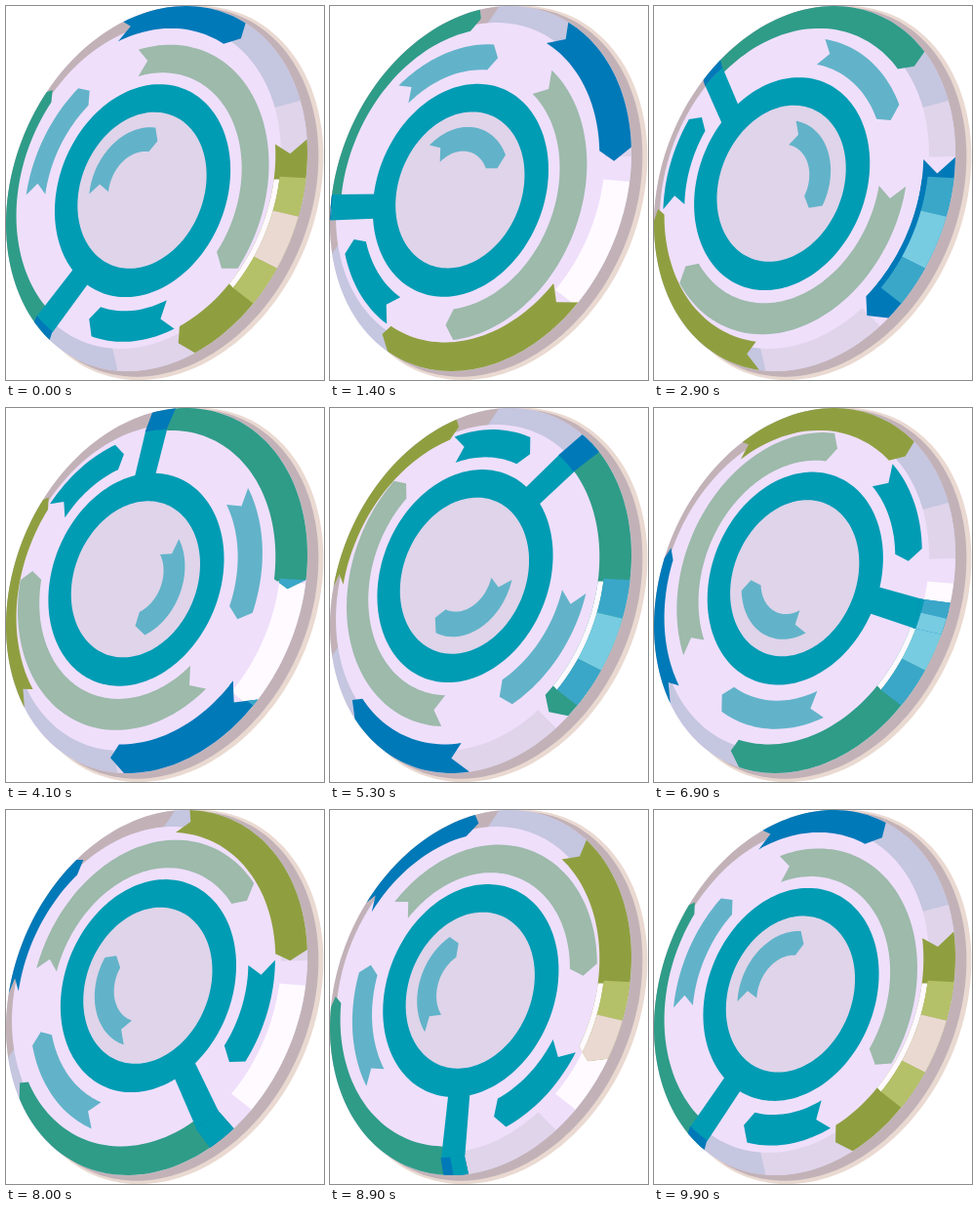
An HTML page with a canvas for the animation above (10 s loop, 326x383 px).

```html
<!DOCTYPE html>
<html lang="en">
<head>
<meta charset="utf-8">
<style>
html, body { margin: 0; width: 326px; height: 383px; overflow: hidden; background: #fff; }
canvas { display: block; }
</style>
</head>
<body>
<canvas id="stage" width="326" height="383"></canvas>
<script>
const ctx = document.getElementById('stage').getContext('2d');
const LOOP = 10000, STEP = 100, RAD = Math.PI / 180;
const AX = 154.5, SHEAR = -36.3, AY = 183.4;
const RIM = 0.893, EDGE = 0.86;
const TEAL = '#009cb4', SKY = '#62b3c9', PALE = '#dfd4ea', FACE = '#efdffb', SHINE = '#fffaff';

// Centre of the disc's contour at each radius: the face bulges up and left.
const CENTRES = [[0.3, 135, 179], [0.42, 138, 180.5], [0.55, 138, 180.5], [RIM, 144, 184], [1, 154.5, 187]];

// Fixed light on the bevel: start angle, end angle, colour.
const BEVEL = [
  [170, 277, '#c2b2b8'], [277, 342.4, '#c5c6e0'], [342.4, 361, PALE],
  [1, 9, FACE], [9, 51, SHINE], [51, 60, FACE],
  [60, 105, PALE], [105, 170, '#c5c6e0']
];

// Base, half-lit, lit, and the lit strip on the flat face.
const BLUE = ['#0079b8', '#3aa7c9', '#77cce1', '#0079b8'];
const OLIVE = ['#8f9f40', '#b5c168', '#ead9d1', SHINE];
const GREEN = ['#2f9c88', '#3aa7c9', '#77cce1', SHINE];

let spin = 0;

function map(x, y, c) {
  return [c[0] + AX * x, c[1] + SHEAR * x + AY * y];
}

function centre(r) {
  const last = CENTRES.length - 1;
  let i = 1;
  while (i < last && r > CENTRES[i][0]) i++;
  const [r0, x0, y0] = CENTRES[i - 1], [r1, x1, y1] = CENTRES[i];
  const k = Math.min(1, Math.max(0, (r - r0) / (r1 - r0)));
  return [x0 + (x1 - x0) * k, y0 + (y1 - y0) * k];
}

// Point in stage space, angle in degrees.
function fixed(r, a) {
  return map(r * Math.cos(a * RAD), r * Math.sin(a * RAD), centre(r));
}

// Point on the turning disc, with slight perspective.
function turning(r, a, off) {
  const b = (a + spin) * RAD;
  const p = fixed(r, (b + 0.085 * Math.min(1, r) * Math.sin(b - Math.PI / 4)) / RAD);
  if (!off) return p;
  const w = (78.6 + spin) * RAD;
  return map(0.048 * Math.cos(w), 0.048 * Math.sin(w), p);
}

function trace(points) {
  ctx.beginPath();
  points.forEach(p => ctx.lineTo(p[0], p[1]));
  ctx.closePath();
}

function fill(points, color) {
  trace(points);
  ctx.fillStyle = color;
  ctx.fill();
}

function arc(at, r, a, b) {
  const n = Math.max(2, Math.ceil(Math.abs(b - a) / 2));
  return Array.from({ length: n + 1 }, (_, i) => at(r, a + (b - a) * i / n));
}

function oval(cx, cy, scale) {
  return arc((r, a) => map(r * Math.cos(a * RAD), r * Math.sin(a * RAD), [cx, cy]), scale, 0, 360);
}

function sector(r0, r1, a, b, color) {
  fill([...arc(fixed, r1, a, b), ...arc(fixed, r0, b, a)], color);
}

// Band with a notched tail and a pointed head.
function arrow(r0, r1, tail, head, notch, tip, off) {
  const at = (r, a) => turning(r, a, off);
  const mid = (r0 + r1) / 2;
  return [
    ...arc(at, r1, tail, head), at(mid, head + tip),
    ...arc(at, r0, head, tail), at(mid, tail + notch)
  ];
}

// Shape on the bevel, brightened where the light falls.
function lit(points, [base, mid, high, strip], low) {
  fill(points, base);
  ctx.save();
  trace(points);
  ctx.clip();
  sector(0.84, RIM, 9, 50, strip);
  sector(RIM, 1.02, 8, 20, mid);
  sector(RIM, 1.02, 20, 37, high);
  sector(RIM, 1.02, 37, 50, mid);
  if (low) sector(0.84, 1.02, 50, 100, low);
  ctx.restore();
}

function ring(r0, r1, color) {
  const at = (r, a) => turning(r, a, true);
  ctx.beginPath();
  for (const r of [r0, r1]) {
    arc(at, r, 0, 360).forEach((p, i) => i ? ctx.lineTo(p[0], p[1]) : ctx.moveTo(p[0], p[1]));
    ctx.closePath();
  }
  ctx.fillStyle = color;
  ctx.fill('evenodd');
}

// The handle sits a little below the face centre and is cut off by the disc's edge.
function handle(a) {
  const shift = points => points.map(([x, y]) => [x - 5, y + 5]);
  ctx.save();
  trace(oval(154.5, 187, 1));
  ctx.clip();
  fill(shift([
    turning(0.5, a - 8, true), turning(0.9, a - 4.8),
    turning(0.9, a + 4.8), turning(0.5, a + 8, true)
  ]), TEAL);
  lit(shift([...arc(turning, 1.07, a - 4.4, a + 4.4), ...arc(turning, RIM, a + 4.8, a - 4.8)]),
    [...BLUE.slice(0, 3), TEAL], TEAL);
  ctx.restore();
}

function draw(t) {
  spin = t / LOOP * 360;
  ctx.fillStyle = '#fff';
  ctx.fillRect(0, 0, 326, 383);

  fill(oval(167, 191.5, 1.025), '#ead9d1');
  fill(oval(164, 190.5, 1.012), '#c2b2b8');
  fill(oval(154.5, 187, 1), PALE);
  BEVEL.forEach(([a, b, color]) => sector(0.88, 1, a, b + 0.3, color));
  fill(oval(144, 184, RIM), FACE);

  lit(arrow(EDGE, 1, 260, 311, 5, 4), BLUE);
  lit(arrow(EDGE, 1, -1, 73, 4, 3), OLIVE);
  lit(arrow(EDGE, 1, 131, 223, 0, 3), GREEN);
  handle(132);

  fill(arc((r, a) => turning(r, a, true), 0.5, 0, 360), PALE);
  ring(0.428, 0.583, TEAL);
  fill(arrow(0.205, 0.34, 186, 289, 10, 9, true), SKY);

  fill(arrow(0.65, 0.812, -91, 42, 5, 4, true), '#9dbaab');
  fill(arrow(0.665, 0.812, 188, 237, 5, 4, true), SKY);
  fill(arrow(0.655, 0.815, 75, 113, 5, 4, true), TEAL);
}

function tick() {
  const t = performance.now() % LOOP;
  draw(Math.floor(t / STEP) * STEP);
  requestAnimationFrame(tick);
}
tick();
</script>
</body>
</html>
```
